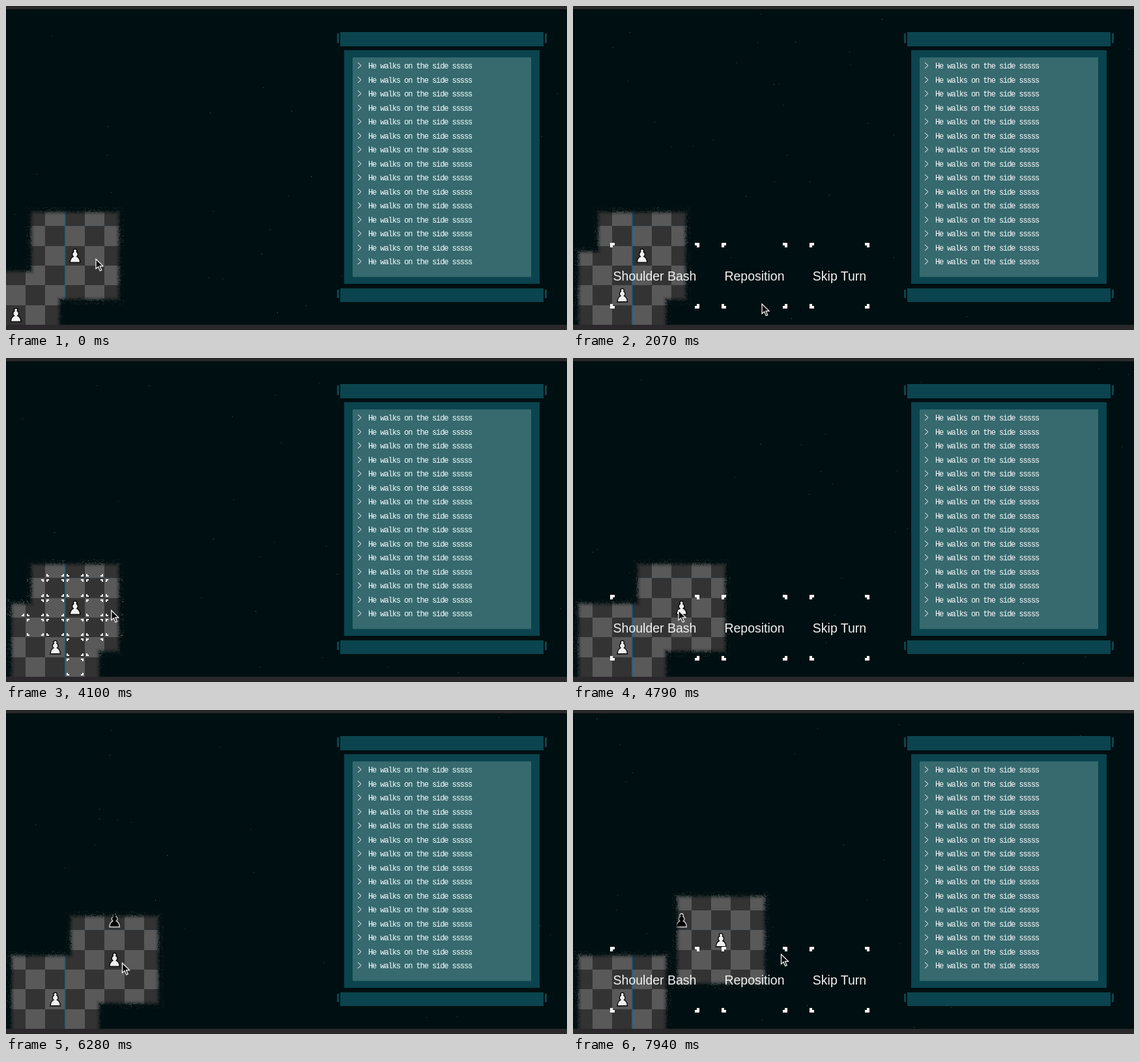
These frames come from a looping animation (861 by 498 pixels, 8000 ms). An HTML page with a canvas:

```html
<!DOCTYPE html>
<html lang="en">
<head>
<meta charset="utf-8">
<title>Chess in the fog</title>
<style>
html, body { margin: 0; width: 100%; height: 100%; overflow: hidden; background: #000f11; }
canvas, svg { position: absolute; left: 0; top: 0; display: block; }
.log { font: 12px "Liberation Mono", monospace; letter-spacing: -1.08px; fill: #fff; white-space: pre; }
.menu text { font: 19.5px "Liberation Sans", Arial, sans-serif; fill: #f2f2f2; text-anchor: middle; }
</style>
</head>
<body>
<canvas id="world" width="861" height="498"></canvas>
<svg width="861" height="498" viewBox="0 0 861 498">
  <g fill="#2a282b">
    <rect width="861" height="5"/>
    <rect y="490" width="861" height="8"/>
  </g>
  <g fill="#0b444e">
    <rect x="513" y="40" width="312" height="22"/>
    <rect x="508" y="42" width="3" height="15"/>
    <rect x="827" y="42" width="3" height="15"/>
    <rect x="519" y="68" width="300" height="359"/>
    <rect x="513" y="434" width="312" height="21"/>
    <rect x="508" y="436" width="3" height="13"/>
    <rect x="827" y="436" width="3" height="13"/>
  </g>
  <rect x="532" y="79" width="274" height="337.5" rx="1" fill="#366a6f"/>
  <g id="log"></g>
  <g id="menu" class="menu"></g>
  <path id="cursor" d="M0 0V15L3.5 11.8 6.3 18 8.7 17 6 10.8H11Z" fill="#0a0a0a" stroke="#fff" stroke-width="1.2"/>
</svg>
<script>
const LOOP = 8000, TICK = 87.25;
const W = 861, H = 498, FLOOR = 490;
const BOARD = { y: 270, w: 330, h: 220 };
const CW = 30.29, CH = 30.32;
const $ = id => document.getElementById(id);
const clamp = (v, a = 0, b = 1) => Math.min(b, Math.max(a, v));
const ease = p => p * p * (3 - 2 * p);
const cellX = c => Math.round(c * CW - .2);
const cellY = r => Math.round(FLOOR - r * CH);

// time, x, y
const cursorKeys = [
  [0, 138, 389], [520, 14, 474], [720, 14, 474], [1180, 74, 444], [1480, 74, 444],
  [2070, 290, 458], [2380, 398, 424], [2560, 398, 424], [3220, 125, 387], [3380, 106, 386],
  [3620, 106, 386], [4120, 162, 388], [4830, 162, 388], [5400, 398, 403], [5640, 398, 403],
  [6400, 163, 388], [6940, 163, 388], [7350, 228, 356], [7600, 228, 356], [7940, 319.5, 375.5], [8000, 326, 374]
];
// time, column, row
const whiteA = [[0, 0, 0], [1280, 0, 0], [1430, 2, 1]];
const whiteB = [[0, 3, 3], [4220, 3, 3], [4370, 5, 3], [7430, 5, 3], [7580, 7, 4]];
const black = [[0, 5, 8], [5850, 5, 8], [6050, 5, 5]];
const menuTimes = [[1480, 2470], [4420, 5480], [7630, 8000]];
const moveTimes = [[640, 1280, whiteA], [3500, 4220, whiteB], [6550, 7430, whiteB]];

function at(keys, t) {
  let i = 0;
  while (i < keys.length - 1 && keys[i + 1][0] <= t) i++;
  const a = keys[i], b = keys[i + 1];
  if (!b) return [a[1], a[2]];
  const p = ease((t - a[0]) / (b[0] - a[0]));
  return [a[1] + (b[1] - a[1]) * p, a[2] + (b[2] - a[2]) * p];
}
const within = (spans, t) => spans.find(s => t >= s[0] && t < s[1]);

function seeded(seed) {
  let s = Math.imul(seed + 1, 0x9e3779b1);
  return () => {
    s = s + 0x6d2b79f5 | 0;
    let v = Math.imul(s ^ s >>> 15, 1 | s);
    v = v + Math.imul(v ^ v >>> 7, 61 | v) ^ v;
    return ((v ^ v >>> 14) >>> 0) / 4294967296;
  };
}

function layer(w, h) {
  const c = document.createElement('canvas');
  c.width = w;
  c.height = h;
  return c.getContext('2d');
}
const world = $('world').getContext('2d');
const board = layer(W, H);
const fog = layer(BOARD.w, BOARD.h);
const mask = fog.createImageData(BOARD.w, BOARD.h);
const pawnShape = new Path2D('M22.5 9c-2.21 0-4 1.79-4 4 0 .89.29 1.71.78 2.38C17.33 16.5 16 18.59 16 21c0 2.03.94 3.84 2.41 5.03-3 1.06-7.41 5.55-7.41 13.47h23c0-7.92-4.41-12.41-7.41-13.47 1.47-1.19 2.41-3 2.41-5.03 0-2.41-1.33-4.5-3.28-5.62.49-.67.78-1.49.78-2.38 0-2.21-1.79-4-4-4z');

const centre = ([c, r]) => [(c + .5) * CW, FLOOR - (r + .5) * CH];

function pawn(pos, fill, line) {
  const [x, y] = centre(pos);
  board.save();
  board.translate(x, y);
  board.scale(.67, .67);
  board.translate(-22.5, -24.25);
  board.fillStyle = fill;
  board.strokeStyle = line;
  board.lineWidth = 2;
  board.fill(pawnShape);
  board.stroke(pawnShape);
  board.restore();
}

function cellMark(c, r) {
  const x0 = cellX(c) + 2, x1 = cellX(c + 1) - 2;
  const y0 = cellY(r + 1) + 2, y1 = cellY(r) - 2;
  board.fillStyle = '#fff';
  for (const [x, sx] of [[x0, 1], [x1, -1]])
    for (const [y, sy] of [[y0, 1], [y1, -1]]) {
      board.fillRect(x, y, 4 * sx, 2 * sy);
      board.fillRect(x, y, 2 * sx, 4 * sy);
    }
}

// Solid near the pawns, grainy at the rim, loose specks just outside.
function drawFog(spots, rnd) {
  const d = mask.data;
  for (let y = 0, i = 3; y < BOARD.h; y++)
    for (let x = 0; x < BOARD.w; x++, i += 4) {
      let dist = 999;
      for (const [cx, cy] of spots)
        dist = Math.min(dist, Math.max(Math.abs(x + .5 - cx), Math.abs(y + .5 + BOARD.y - cy)));
      let a = clamp((71 - dist) / 9);
      if (a < 1 && dist < 75) {
        if (a > 0) a = rnd() < a * 1.5 ? .4 + .6 * a : a * .4;
        else a = rnd() < .15 ? .35 : 0;
      }
      d[i] = a * 255;
    }
  fog.putImageData(mask, 0, 0);
}

function drawBoard(t, rnd) {
  const a = at(whiteA, t), b = at(whiteB, t), k = at(black, t);
  board.globalCompositeOperation = 'source-over';
  board.clearRect(0, 0, W, H);
  for (let c = 0; c < 11; c++)
    for (let r = 0; r < 8; r++) {
      board.fillStyle = (c + r) % 2 ? '#595959' : '#333';
      board.fillRect(cellX(c), cellY(r + 1), cellX(c + 1) - cellX(c), cellY(r) - cellY(r + 1));
    }
  board.fillStyle = 'rgba(28,85,125,.25)';
  board.fillRect(91, 338, 240, 1);
  board.fillStyle = '#135f94';
  board.fillRect(90, 200, 1.5, 290);

  const move = within(moveTimes, t);
  if (move) {
    const [pc, pr] = at(move[2], t);
    const taken = (c, r) => [a, b, k].some(p => p[0] === c && p[1] === r);
    for (let c = 0; c < 11; c++)
      for (let r = 0; r < 8; r++)
        if (Math.abs(c - pc) + Math.abs(r - pr) <= 3 && !taken(c, r)) cellMark(c, r);
  }
  pawn(k, '#000', '#d8d8d8');
  pawn(a, '#f0f0f0', '#000');
  pawn(b, '#f0f0f0', '#000');

  drawFog([centre(a), centre(b)], rnd);
  board.globalCompositeOperation = 'destination-in';
  board.drawImage(fog.canvas, 0, BOARD.y);
  world.drawImage(board.canvas, 0, 0);
}

function drawWorld(tick) {
  const rnd = seeded(tick);
  world.fillStyle = '#000f11';
  world.fillRect(0, 0, W, H);
  const tints = ['#3b4a4d', '#2c5257', '#57473c', '#453a3d', '#626c6e'];
  for (let i = 0; i < 36; i++) {
    world.fillStyle = tints[rnd() * tints.length | 0];
    world.fillRect(rnd() * W | 0, 6 + rnd() * 484 | 0, 1, 1);
  }
  drawBoard(tick * TICK, rnd);
}

function buildLog() {
  let s = '';
  for (let i = 0; i < 15; i++) {
    const y = Math.round(92 + i * 21.5);
    s += `<path d="M540 ${y - 5}l5 4.5l-5 4.5" fill="none" stroke="#fff"/>` +
      `<text class="log" x="556" y="${y + 4}">He walks on the side sssss</text>`;
  }
  $('log').innerHTML = s;
}

function buildMenu() {
  const items = [['Shoulder Bash', 57, 194], ['Reposition', 228, 329], ['Skip Turn', 363, 455]];
  const corner = (x, y, sx, sy) =>
    `<path d="M0 0H7V4H4V7H0Z" fill="#fff" transform="translate(${x} ${y}) scale(${sx} ${sy})"/>`;
  $('menu').innerHTML = items.map(([label, x0, x1]) =>
    corner(x0, 364, 1, 1) + corner(x1, 364, -1, 1) + corner(x0, 465, 1, -1) + corner(x1, 465, -1, -1) +
    `<text x="${(x0 + x1) / 2}" y="421.5">${label}</text>`).join('');
}

let shown = -1;
function render(t) {
  const tick = Math.floor((t + 1) / TICK);
  if (tick !== shown) drawWorld(shown = tick);
  $('menu').style.display = within(menuTimes, t) ? '' : 'none';
  const [x, y] = at(cursorKeys, t);
  $('cursor').setAttribute('transform', `translate(${x.toFixed(2)} ${y.toFixed(2)})`);
}

buildLog();
buildMenu();
const start = performance.now();
function loop() {
  render((performance.now() - start) % LOOP);
  requestAnimationFrame(loop);
}
loop();
</script>
</body>
</html>
```
